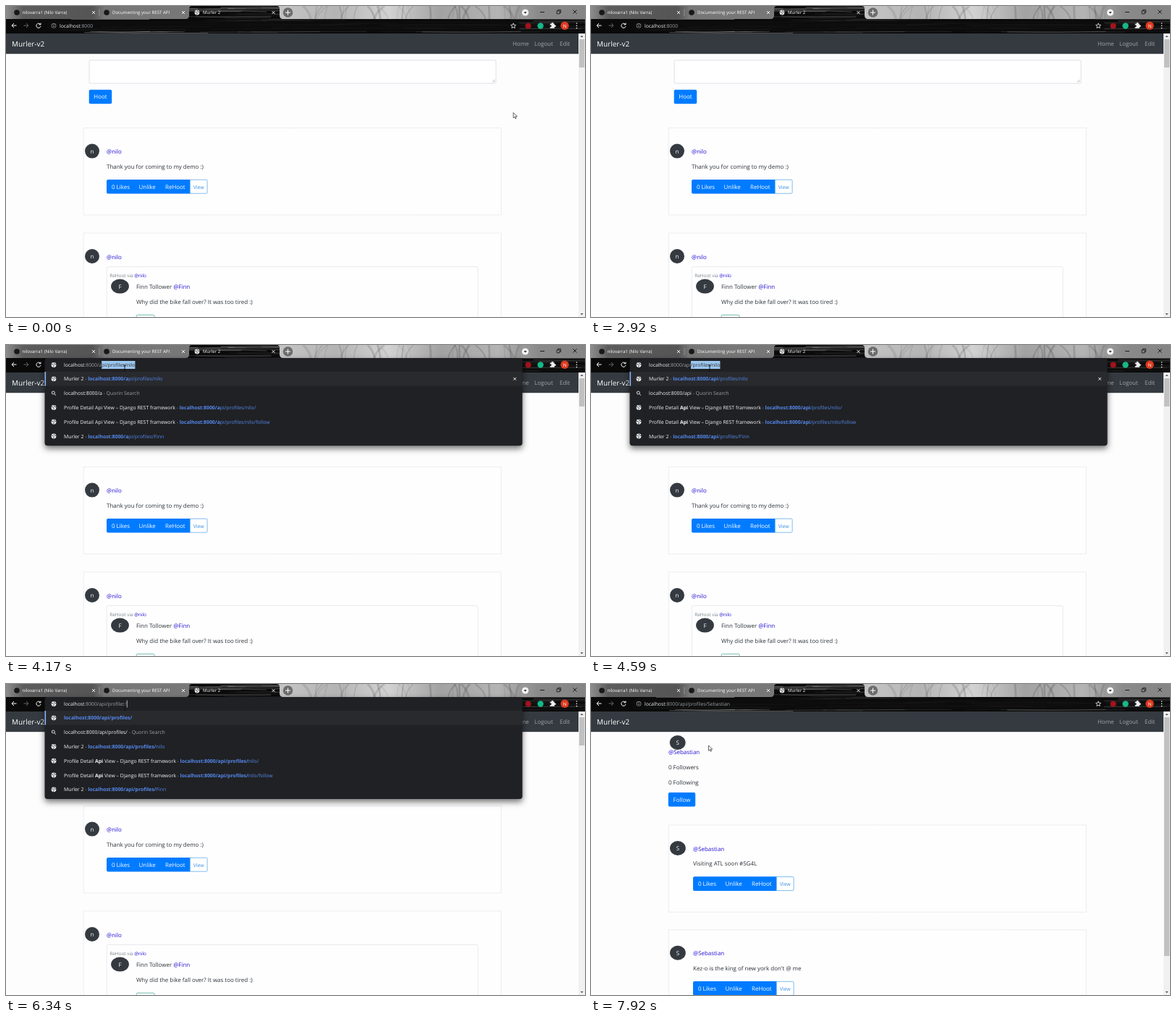
An HTML page with a canvas for the animation above (8 s loop, 800 by 430 pixels).

```html
<!DOCTYPE html>
<html lang="en">
<head>
<meta charset="utf-8">
<style>
  html, body { margin: 0; width: 100%; height: 100%; overflow: hidden; background: #fdfdfe; }
  canvas { display: block; width: 100vw; height: 100vh; }
</style>
</head>
<body>
<canvas width="800" height="430"></canvas>
<script>
const ctx = document.querySelector('canvas').getContext('2d');
const LOOP = 8000, FOCUS = 3250, CARET = 3500, TYPE = 4000, ENTER = 7340, LOADED = 7590;
const BLUE = '#007bff', DARK = '#343a40', INK = '#2b3035', LINK = '#2410cf';
const LIGHT = '#f1f3f4', DIM = '#9aa0a6', URL_BLUE = '#5589ee';
const HOST = 'localhost', PORT = ':8000', BASE = '/api/profiles/';

// Pages known to the address bar: [title, path]
const DETAIL = 'Profile Detail Api View – Django REST framework';
const pages = [
  ['Murler 2', BASE + 'nilo'],
  [DETAIL, BASE + 'nilo/'],
  [DETAIL, BASE + 'nilo/follow'],
  ['Murler 2', BASE + 'Finn'],
  ['', BASE + 'nillytest'],
  ['Murler 2', BASE + 'Sebastian'],
];

// Typing steps: [time, typed path, completion suppressed]
const keys = [];
['/', '/a', '/ap', '/api'].forEach((s, i) => keys.push([TYPE + i * 167, s]));
for (let i = 1; i <= 10; i++) keys.push([4757 + i * 83, '/api' + '/profiles/'.slice(0, i)]);
keys.push([5670, BASE + 'ni'], [5750, BASE + 'ni', true], [5920, BASE + 'n', true], [6090, BASE, true],
  [6500, BASE + 'S'], [6670, BASE + 'Se'], [6840, BASE + 'Seb']);

// Pointer path: [time, x, y]
const path = [
  [0, 701, 147.5], [89, 701, 147.5], [90, 195, 408], [339, 195, 408], [340, 189, 412], [750, 189, 412],
  [1170, 9, 6], [1500, 9, 6], [1900, 0, -2], [2250, 0, -2], [3090, 164, 32],
  [ENTER, 164, 32], [7750, 162.5, 85], [LOOP, 162.5, 85],
];

function font(size, weight = 400) {
  ctx.font = `${weight} ${size}px "Open Sans", "Noto Sans", sans-serif`;
  ctx.textRendering = 'geometricPrecision';
}

function text(str, x, y, size = 7.96, color = INK, weight = 400, align = 'left') {
  font(size, weight);
  ctx.textAlign = align;
  ctx.fillStyle = color;
  ctx.fillText(str, x, y);
  return x + ctx.measureText(str).width;
}

// Consecutive pieces of one line: [string, color, weight]
function runs(x, y, size, pieces) {
  for (const [str, color, weight] of pieces) x = text(str, x, y, size, color, weight);
  return x;
}

function box(x, y, w, h, fill, stroke, radius = 0, lineWidth = 0.7) {
  ctx.beginPath();
  ctx.roundRect(x, y, w, h, radius);
  if (fill) { ctx.fillStyle = fill; ctx.fill(); }
  if (stroke) { ctx.strokeStyle = stroke; ctx.lineWidth = lineWidth; ctx.stroke(); }
}

function oval(x, y, rx, fill, ry = rx) {
  ctx.beginPath();
  ctx.ellipse(x, y, rx, ry, 0, 0, 7);
  ctx.fillStyle = fill;
  ctx.fill();
}

function stroke(d, color, width = 1, x = 0, y = 0) {
  ctx.save();
  ctx.translate(x, y);
  ctx.strokeStyle = color;
  ctx.lineWidth = width;
  ctx.stroke(new Path2D(d));
  ctx.restore();
}

function fillPath(d, color, x = 0, y = 0) {
  ctx.save();
  ctx.translate(x, y);
  ctx.fillStyle = color;
  ctx.fill(new Path2D(d));
  ctx.restore();
}

function seeded(seed) {
  return () => (seed = (seed * 16807) % 2147483647) / 2147483647;
}

const cross = (x, y, r, color, width) => stroke(`M${-r} ${-r}L${r} ${r}M${r} ${-r}L${-r} ${r}`, color, width, x, y);

function globe(x, y) {
  oval(x, y, 3.4, LIGHT);
  stroke('M-3 -1L-.8 -.6L.4 1L-.6 3M0 -3.2L1 -1.2L3.2 -.4', '#222', 0.8, x, y);
}

function magnifier(x, y) {
  stroke('M1.3 -.6A2 2 0 1 1 -2.7 -.6A2 2 0 1 1 1.3 -.6M.8 .9L3 3.1', LIGHT, 0.9, x, y);
}

// ---------- browser frame ----------
// Grey woodland backdrop behind the tabs
function backdrop() {
  const sky = ctx.createLinearGradient(0, 0, 800, 0);
  [[0, '#8c8c8c'], [0.03, '#5c5c5c'], [0.15, '#555'], [0.17, '#777'], [0.31, '#777'], [0.48, '#c4c4c4'],
   [0.57, '#b4b4b4'], [0.66, '#d2d2d2'], [0.75, '#a2a2a2'], [0.85, '#b4b4b4'], [0.92, '#8a8a8a'], [1, '#858585']]
    .forEach(([p, c]) => sky.addColorStop(p, c));
  ctx.fillStyle = sky;
  ctx.fillRect(0, 0, 800, 18);
  const rnd = seeded(77);
  for (let i = 0; i < 40; i++) {
    const x = 420 + rnd() * 290, lean = rnd() * 30 - 15;
    stroke(`M${x} 18Q${x + lean * 0.2} 8 ${x + lean} 0`, `rgba(60,60,60,${0.06 + rnd() * 0.2})`, 0.6 + rnd() * 2.5);
  }
}

// Black toolbar and active tab, brushed with pale horizontal streaks
function darkTheme() {
  ctx.save();
  ctx.clip(new Path2D('M0 18H248Q253 18 253 13V4Q253 0 257 0H374Q378 0 378 4V13Q378 18 383 18H800V38H0Z'));
  ctx.fillStyle = '#0a0a0a';
  ctx.fillRect(0, 0, 800, 38);
  const rnd = seeded(2024);
  for (let i = 0; i < 110; i++) {
    const x = 60 + rnd() * 700, y = rnd() * 37, len = 50 + rnd() * 150;
    stroke(`M${x} ${y}q${len / 2} ${rnd() * 4 - 2} ${len} ${rnd() * 2 - 1}`,
      `rgba(225,225,225,${0.1 + rnd() * 0.5})`, 0.3 + rnd() * 0.6);
  }
  ctx.restore();
}

function titleBar() {
  stroke('M129 4V14', '#aaa', 0.6);
  oval(15, 9, 3.8, '#181818');
  oval(139, 9, 3.8, '#181818');
  globe(264, 9);
  text('nilovarra1 (Nilo Varra)', 22.5, 11, 6.1, '#fff');
  text('Documenting your REST API', 147, 11, 6.1, '#fff');
  text('Murler 2', 272, 11, 6.1, '#fff');
  [121, 245, 369.5].forEach(x => cross(x, 9, 2, '#fff', 0.9));
  oval(389.5, 9, 6.8, '#6d6d6d');
  stroke('M386 9H393M389.5 5.5V12.5', '#fff', 1);

  oval(717.5, 9, 4.6, '#f5f5f5');
  fillPath('M-2 -1H2L0 1.8Z', '#333', 717.5, 9);
  stroke('M738 8.5H744', '#111', 0.9);
  box(761, 6.8, 4, 4, null, '#111', 0, 0.8);
  stroke('M762.5 6.5V5.3H766.5V9.3H765.3', '#111', 0.8);
  cross(786, 8, 2.6, '#111', 0.9);
}

function toolbar(t) {
  const focused = t >= FOCUS && t < ENTER;
  box(56, 20.3, 654.5, 14.6, 'rgba(13,13,13,.92)', focused ? '#4a8fe0' : null, 7.3, 1.2);

  stroke('M14.5 27H8M11 24L8 27L11 30', '#fff', 1);
  stroke('M24.5 27H31M28 24L31 27L28 30', '#666', 1);
  stroke('M47.2 25A3.1 3.1 0 1 0 48 28M48 23.5V25.8H45.5', '#fff', 1);
  oval(66, 27.3, 3.3, DIM);
  oval(66, 27.3, 2.6, '#111');
  stroke('M66 26.9V29M66 25.4V26', LIGHT, 0.7);

  const url = t >= ENTER ? PORT + BASE + 'Sebastian' : PORT;
  if (focused && t < CARET) {
    font(6.83);
    box(74, 22, ctx.measureText(HOST + PORT).width, 11, '#a3ccf4');
    text(HOST + PORT, 74, 30, 6.83, '#111');
  } else {
    const end = runs(74, 30, 6.83, [[HOST, LIGHT], [url, DIM]]);
    if (focused) stroke(`M${end + 0.7} 22.5V32.5`, LIGHT, 0.7);
  }
  if (focused) {
    [[681, 24], [685, 24], [681, 28], [685, 28]].forEach(([x, y]) => box(x + 0.4, y + 0.2, 2.4, 2.4, null, '#ccc', 0, 0.8));
  }
  stroke('M0 -3.5L1 -1.1L3.5 -1L1.6 .7L2.2 3.2L0 1.9L-2.2 3.2L-1.6 .7L-3.5 -1L-1 -1.1Z', LIGHT, 0.8, 701, 27.3);

  oval(721.5, 27.5, 4, '#a3131c');
  oval(738.5, 27.5, 4.2, '#16b888');
  fillPath('M-3.3 -2.2H-1.2A1.3 1.3 0 1 1 1.2 -2.2H2.8V-.2A1.3 1.3 0 1 1 2.8 2V4H-3.3V2A1.3 1.3 0 1 0 -3.3 -.2Z', '#f2f2f2', 755, 26.8);
  oval(772, 27.3, 5.7, '#dc3b20');
  text('N', 772, 29.7, 6.2, '#fff', 400, 'center');
  [24, 27.3, 30.6].forEach(y => oval(788.5, y, 0.8, '#fff'));
}

function scrollbar(bottom) {
  ctx.fillStyle = '#f1f1f1';
  ctx.fillRect(791, 38, 9, 392);
  ctx.fillStyle = '#c1c1c1';
  ctx.fillRect(792, 46, 7.3, bottom - 46);
  fillPath('M-2 1L0 -1.2L2 1Z', '#505050', 795.6, 42);
  fillPath('M-2 -1L0 1.2L2 -1Z', '#505050', 795.6, 426);
}

// ---------- page ----------
function navbar() {
  ctx.fillStyle = DARK;
  ctx.fillRect(0, 37.5, 791, 28.7);
  text('Murler-v2', 8, 55.7, 9.95, '#fff');
  text('Home', 700, 55, 7.96, '#a3a6a9');
  text('Logout', 730, 55, 7.96, '#a3a6a9');
  text('Edit', 765, 55, 7.96, '#a3a6a9');
}

function avatar(letter, x, y, rx) {
  oval(x, y, rx, DARK, 10);
  text(letter, x, y + 3, 7.96, '#fff', 400, 'center');
}

function button(label, x, y, w) {
  box(x, y, w, 19.6, BLUE, null, 2);
  text(label, x + w / 2, y + 12.7, 7.96, '#fff', 400, 'center');
}

function actions(x, y) {
  box(x, y, 115.5, 19.6, BLUE, null, [2, 0, 0, 2]);
  text('0 Likes', x + 7, y + 12.8, 7.96, '#fff');
  text('Unlike', x + 44.5, y + 12.8, 7.96, '#fff');
  text('ReHoot', x + 81, y + 12.8, 7.96, '#fff');
  box(x + 115.3, y + 0.3, 23.8, 19, '#fff', '#4a9fe8', [0, 1.5, 1.5, 0], 0.7);
  text('View', x + 127.2, y + 12.6, 6.9, '#3d8fe8', 400, 'center');
}

function card(y, letter, rx, user, x) {
  box(107.3, y, 577, 120.3, '#fefeff', '#e2e5e9', 0, 0.7);
  avatar(letter, 109 + rx, y + 32, rx);
  text(user, x, y + 35.5, 7.96, LINK);
}

function post(y, letter, rx, user, x, message) {
  card(y, letter, rx, user, x);
  text(message, x, y + 56.2);
  actions(x, y + 71.3);
}

function feed() {
  box(115, 75, 562, 32, '#fff', '#ced4da', 2);
  stroke('M672 105.3L675.5 101.8M674 105.3L675.5 103.8', '#777', 0.5);
  button('Hoot', 114.7, 115.7, 31.5);
  post(168.6, 'n', 10, '@nilo', 139, 'Thank you for coming to my demo :)');
  card(314, 'n', 10, '@nilo', 139);
  box(139.2, 360.5, 512.8, 90, '#fefeff', '#dfe2e6', 2);
  runs(143.3, 374.6, 6.4, [['ReHoot via ', '#7b838a'], ['@nilo', LINK]]);
  avatar('F', 157.5, 387.6, 12.4);
  runs(180, 391, 7.96, [['Finn Tollower ', INK], ['@Finn', LINK]]);
  text('Why did the bike fall over? It was too tired :)', 180, 412);
  box(180.2, 427.2, 24.8, 18, '#fff', '#35a08a', 1.5);
}

function profile() {
  avatar('S', 119.7, 81, 10.9);
  text('@Sebastian', 107, 97, 7.96, LINK);
  text('0 Followers', 107, 117.8);
  text('0 Following', 107, 138.5);
  button('Follow', 106.8, 150, 37.4);
  post(195, 'S', 10.9, '@Sebastian', 141, 'Visiting ATL soon #SG4L');
  post(339.8, 'S', 10.9, '@Sebastian', 141, 'Kez-o is the king of new york don\'t @ me');
}

// ---------- address suggestions ----------
function suggestionRow(index, icon, pieces) {
  const y = 46.8 + index * 19.8;
  icon(66, y);
  runs(80, y + 2.5, 6.9, pieces);
}

function dropdown(t) {
  const [, typed, plain] = keys.filter(k => k[0] <= t).pop();
  const matches = pages.filter(p => p[1].startsWith(typed)).slice(0, 4);
  const query = HOST + PORT + typed;
  const urlPieces = page => [[query, URL_BLUE, 700], [page[1].slice(typed.length), URL_BLUE]];
  const pagePieces = page => {
    if (!page[0]) return urlPieces(page);
    const title = page[0].split(/(Api)/).map(s => [s, LIGHT, s === 'Api' && typed.includes('api') ? 700 : 400]);
    return [...title, [' - ', DIM], ...urlPieces(page)];
  };
  const rows = matches.map(page => [globe, pagePieces(page)]);
  if (plain) rows.unshift([globe, [[query, URL_BLUE, 700]]]);
  rows.splice(1, 0, [magnifier, [[query, LIGHT], [' - Quorin Search', DIM]]]);

  const height = 22.2 + rows.length * 19.8;
  ctx.save();
  ctx.shadowColor = 'rgba(0,0,0,.55)';
  ctx.shadowBlur = 8;
  ctx.shadowOffsetY = 4;
  box(53.5, 18, 660, height, '#202124', null, 4);
  ctx.restore();
  ctx.fillStyle = '#292a2e';
  ctx.fillRect(53.5, 37, 660, 19.6);
  ctx.fillStyle = '#8ab4f8';
  ctx.fillRect(53.5, 37, 1.6, 19.6);

  globe(66, 27.5);
  const end = runs(80, 30, 6.8, [[HOST, LIGHT], [PORT + typed, DIM]]);
  if (plain) {
    stroke(`M${end + 0.6} 22.5V32.5`, LIGHT, 0.7);
  } else {
    const rest = matches[0][1].slice(typed.length);
    font(6.8);
    box(end, 22, ctx.measureText(rest).width, 11, '#9bc6ee');
    text(rest, end, 30, 6.8, '#333');
    cross(703, 46.8, 1.9, '#fff', 0.9);
  }
  rows.forEach(([icon, pieces], i) => suggestionRow(i, icon, pieces));
}

// ---------- pointer ----------
function pointer(t) {
  const i = path.findIndex(p => p[0] > t);
  const [t0, x0, y0] = path[i - 1], [t1, x1, y1] = path[i];
  const k = (t - t0) / (t1 - t0);
  const x = x0 + (x1 - x0) * k, y = y0 + (y1 - y0) * k;
  if (x > 56 && x < 711 && y > 20 && y < 36) {
    stroke('M-1.5 -4H1.5M0 -4V4M-1.5 4H1.5', '#111', 0.9, x, y);
  } else {
    const arrow = 'M0 0V7.2L1.7 5.7L2.8 8.2L4 7.7L2.9 5.2H5.2Z';
    fillPath(arrow, '#fff', x, y);
    stroke(arrow, '#222', 0.7, x, y);
  }
}

function frame() {
  const t = performance.now() % LOOP;
  ctx.fillStyle = '#fdfdfe';
  ctx.fillRect(0, 0, 800, 430);
  const loaded = t >= LOADED;
  (loaded ? profile : feed)();
  navbar();
  scrollbar(loaded ? 376 : 85);
  backdrop();
  darkTheme();
  titleBar();
  toolbar(t);
  if (t >= TYPE && t < ENTER) dropdown(t);
  pointer(t);
  requestAnimationFrame(frame);
}
frame();
</script>
</body>
</html>
```
